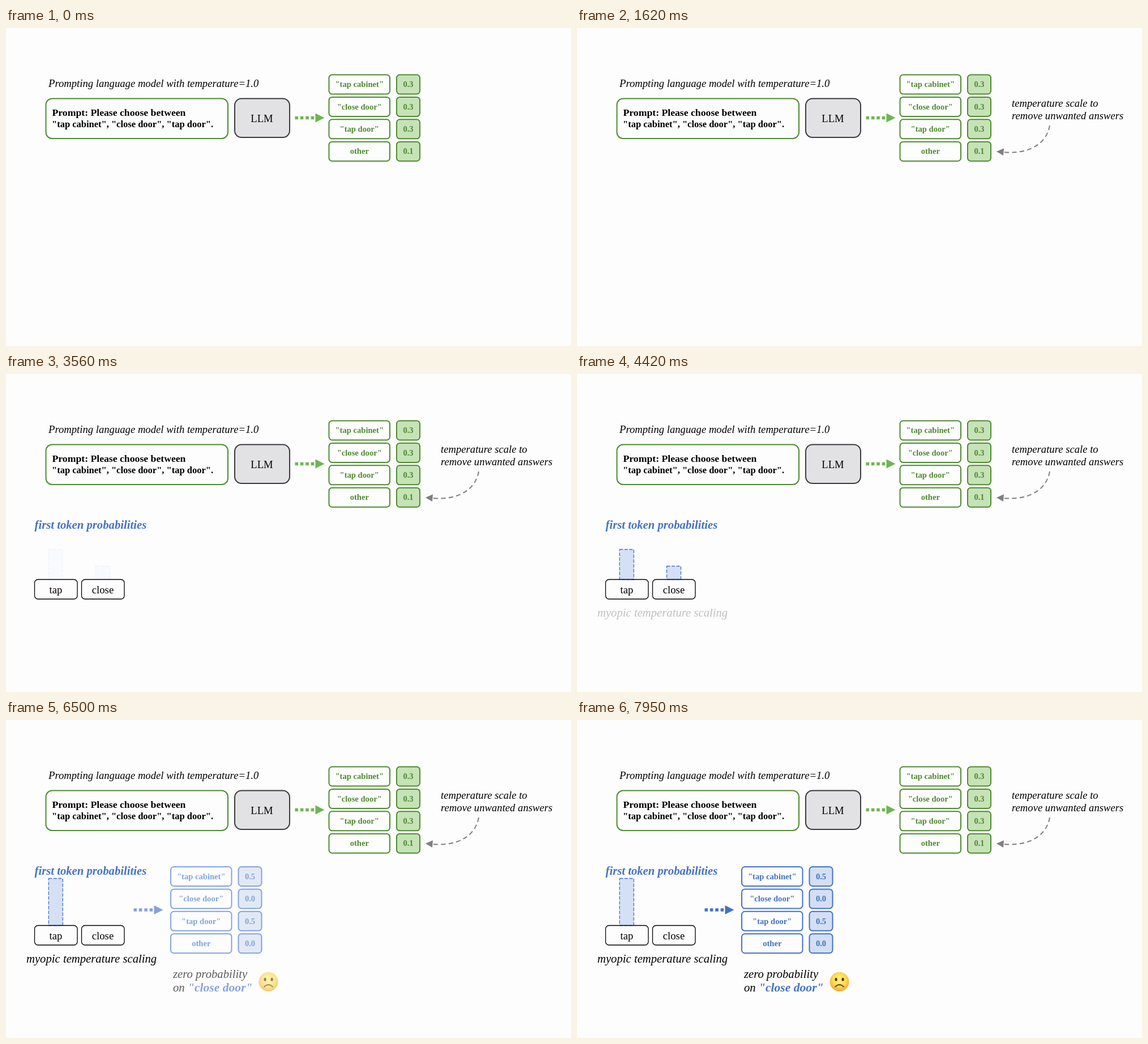
An HTML page for the animation above (7.99 s loop, 998x561 px).

```html
<!DOCTYPE html>
<html lang="en">
<head>
<meta charset="utf-8">
<title>Myopic temperature scaling</title>
<style>
  html, body { margin: 0; width: 100%; height: 100%; overflow: hidden; background: #fdfdfe; }
  svg { display: block; width: 998px; height: 561px; }
  text { font-family: "Liberation Serif", "Times New Roman", serif; font-size: 18.67px; }
  .italic { font-style: italic; }
  .large { font-size: 20.7px; }
  .bold { font-weight: bold; }
  .blue { fill: #4472c4; }
  .label { font-size: 14.6px; font-weight: bold; }
  .mid { text-anchor: middle; }
  .box { fill: none; stroke-width: 2; }
  .token { fill: none; stroke: #000; stroke-width: 1.3; }
  .bar { fill: #d5e0f4; stroke: #4472c4; stroke-width: 1.3; stroke-dasharray: 6 2.5; }

  .green { --ink: #4f8a30; --tint: #c5e3b6; --arrow: #6db650; }
  .azure { --ink: #4472c4; --tint: #d3dff3; --arrow: #4472c4; }
  .table .box { stroke: var(--ink); }
  .table .value { fill: var(--tint); }
  .table text { fill: var(--ink); }
  .arrow path { fill: var(--arrow); }
  .arrow line { stroke: var(--arrow); stroke-width: 5.4; stroke-dasharray: 5.5 3.9; }

  .anim { animation: 7990ms linear infinite both; }
  #advice { animation-name: advice; }
  #heading { animation-name: heading; }
  #tokens { animation-name: tokens; }
  #answers { animation-name: answers; }
  #bars { animation-name: bars; }
  #tapBar { animation-name: grow; }
  #closeBar { animation-name: shrink; }
  #caption { animation-name: caption; }
  #result { animation-name: result; }

  @keyframes advice { 0%, 12.52% { opacity: 0 } 18.77%, 100% { opacity: 1 } }
  @keyframes heading { 0%, 23.4% { opacity: 0 } 29.66%, 100% { opacity: 1 } }
  @keyframes tokens { 0%, 34.67% { opacity: 0 } 40.93%, 100% { opacity: 1 } }
  @keyframes answers {
    0%, 34.67% { opacity: 0 }
    40.93%, 41.18% { opacity: 1 }
    43.8%, 100% { opacity: 0 }
  }
  @keyframes bars { 0%, 44.06% { opacity: 0 } 50.31%, 100% { opacity: 1 } }
  @keyframes grow {
    0%, 61.95% { y: 309.5px; height: 53px }
    68.2%, 100% { y: 279.5px; height: 83px }
  }
  @keyframes shrink {
    0%, 61.95% { y: 339px; height: 23.5px }
    68.2%, 100% { y: 362.5px; height: 0 }
  }
  @keyframes caption { 0%, 53.8% { opacity: 0 } 60.1%, 100% { opacity: 1 } }
  @keyframes result { 0%, 77.35% { opacity: 0 } 83.6%, 100% { opacity: 1 } }
</style>
</head>
<body>
<svg viewBox="0 0 998 561">
  <defs>
    <radialGradient id="skin" cx=".5" cy=".4" r=".62">
      <stop offset="0" stop-color="#fff08a"/>
      <stop offset=".55" stop-color="#fddb55"/>
      <stop offset="1" stop-color="#eba52c"/>
    </radialGradient>
    <g id="arrow" class="arrow">
      <line x1="0" y1="0" x2="36" y2="0"/>
      <path d="M36 -8 L52 0 L36 8 Z"/>
    </g>
  </defs>

  <text class="italic" x="75" y="104">Prompting language model with temperature=1.0</text>
  <rect class="box" x="70.5" y="124.5" width="321.5" height="70.5" rx="11" stroke="#4f8a30"/>
  <text class="bold" x="81.5" y="155" style="font-size:17.7px">Prompt: Please choose between</text>
  <text class="bold" x="81" y="175" style="font-size:16.5px">"tap cabinet", "close door", "tap door".</text>
  <rect class="box" x="404" y="124.5" width="97" height="68.5" rx="12" style="fill:#e2e2e5" stroke="#3a3a3f"/>
  <text class="mid" x="452" y="166">LLM</text>
  <use class="green" href="#arrow" x="510.5" y="158.5"/>
  <g class="table green" transform="translate(570.5 82.5)" data-values="0.3 0.3 0.3 0.1"></g>

  <g id="advice" class="anim">
    <text class="italic" x="768" y="138.5">temperature scale to</text>
    <text class="italic" x="768" y="161">remove unwanted answers</text>
    <path d="M835 172 C829 206 796 223 753 219" fill="none" stroke="#7f7f7f" stroke-width="2" stroke-dasharray="8 5.5"/>
    <path d="M741 218 L754 212.3 L753 225 Z" fill="#7f7f7f"/>
  </g>

  <text id="heading" class="anim italic bold large blue" x="50.5" y="273">first token probabilities</text>

  <g id="answers" class="anim blue">
    <text class="label" x="50" y="311">"tap cabinet"</text>
    <text class="label" x="50" y="342">"tap door"</text>
    <text class="label" x="130.5" y="342">"close door"</text>
  </g>
  <g id="bars" class="anim">
    <rect id="tapBar" class="anim bar" x="75.3" y="309.5" width="25" height="53"/>
    <rect id="closeBar" class="anim bar" x="158.5" y="339" width="25" height="23.5"/>
  </g>
  <g id="tokens" class="anim">
    <rect class="token" x="50.5" y="362.5" width="75.5" height="34.5" rx="6"/>
    <rect class="token" x="133.5" y="362.5" width="75.5" height="34.5" rx="6"/>
    <text class="mid" x="88" y="387">tap</text>
    <text class="mid" x="171" y="387">close</text>
  </g>

  <text id="caption" class="anim italic large" x="36" y="428">myopic temperature scaling</text>

  <g id="result" class="anim">
    <use class="azure" href="#arrow" x="225.5" y="335"/>
    <g class="table azure" transform="translate(291 259)" data-values="0.5 0.0 0.5 0.0"></g>
    <text class="italic large" x="295" y="455">zero probability</text>
    <text class="italic large" x="295" y="478.5">on</text>
    <text class="italic bold blue" x="321" y="478.5" style="font-size:21.6px">"close door"</text>
    <g transform="translate(463.6 461.7)">
      <circle r="17" fill="url(#skin)"/>
      <g fill="#553512">
        <ellipse cx="-6" cy="-4" rx="2.1" ry="3"/>
        <ellipse cx="6" cy="-4" rx="2.1" ry="3"/>
      </g>
      <path d="M-7.5 9 Q0 1.5 7.5 9" fill="none" stroke="#6b4215" stroke-width="1.8" stroke-linecap="round"/>
    </g>
  </g>
</svg>
<script>
  const answers = ['"tap cabinet"', '"close door"', '"tap door"', 'other'];
  const rowStep = 39.4;

  const cell = (x, y, width, label, kind = '') => `
    <rect class="box ${kind}" x="${x}" y="${y}" width="${width}" height="34" rx="5.5"/>
    <text class="label mid" x="${x + width / 2}" y="${y + 21.7}">${label}</text>`;

  for (const table of document.querySelectorAll('.table')) {
    const values = table.dataset.values.split(' ');
    table.innerHTML = answers.map((answer, row) =>
      cell(0, row * rowStep, 107.5, answer) +
      cell(119.5, row * rowStep, 41, values[row], 'value')).join('');
  }
</script>
</body>
</html>
```
